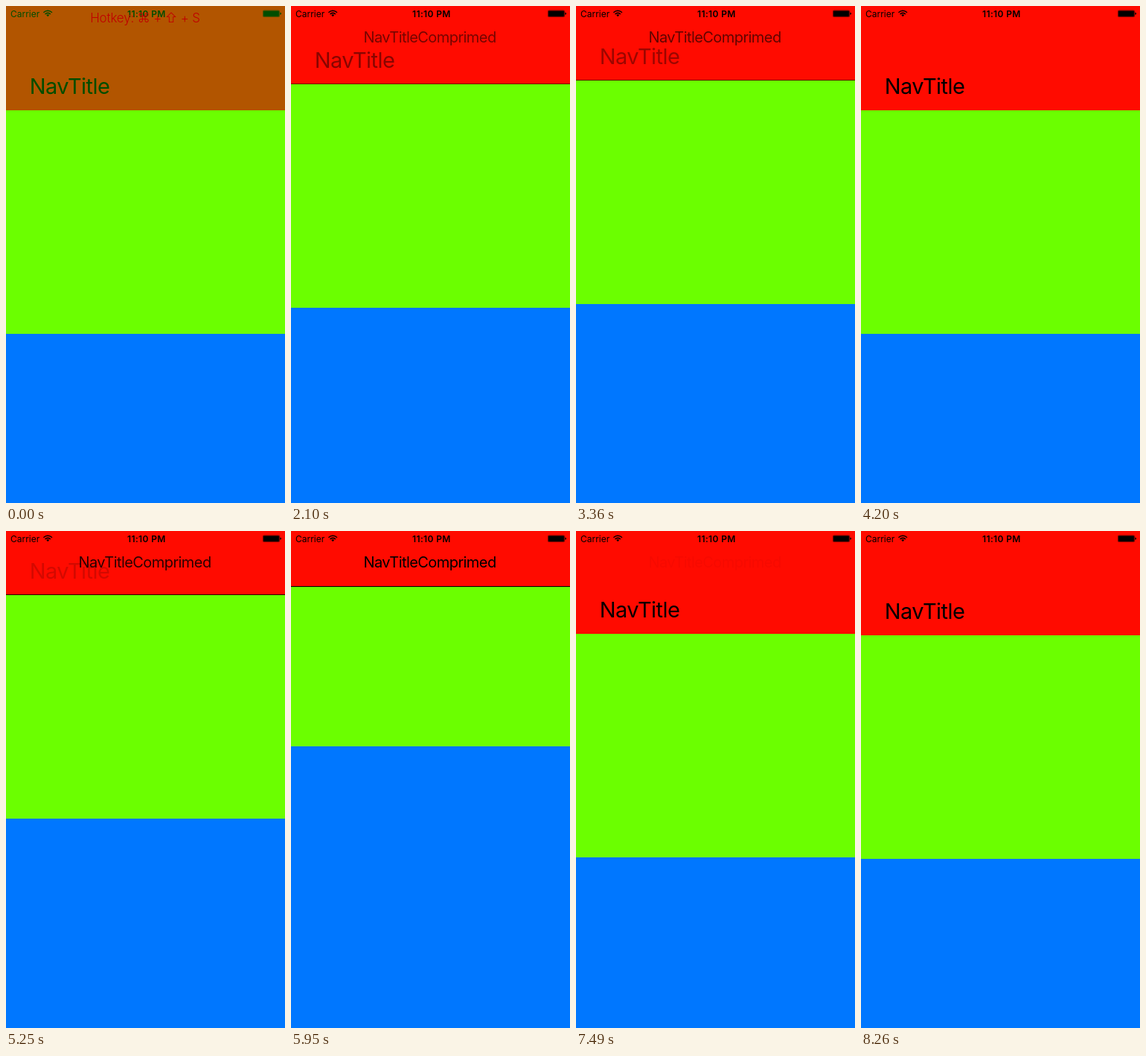
These frames come from a looping animation (375x667 px, 9.03 s). An HTML page:

```html
<!DOCTYPE html>
<html lang="en">
<head>
<meta charset="utf-8">
<title>Collapsing navigation bar</title>
<style>
  html, body { margin: 0; width: 100%; height: 100%; overflow: hidden; background: #fff; }
  svg { display: block; width: 375px; height: 667px; }
  text { font-family: Inter, Roboto, sans-serif; font-optical-sizing: none; }
  #large { font-size: 29px; letter-spacing: -.02em; }
  #compact { font-size: 20px; letter-spacing: -.028em; }
  .status { font-size: 12px; }
  .clock { font-weight: 600; letter-spacing: .03em; }
  .hotkey { font-size: 17px; font-weight: 300; letter-spacing: -.01em; }
  .middle { text-anchor: middle; }
</style>
</head>
<body>
<svg viewBox="0 0 375 667">
  <g id="content">
    <rect width="375" height="300" fill="#6bff00"/>
    <rect y="300" width="375" height="800" fill="#0077ff"/>
  </g>
  <rect id="bar" width="375" fill="#ff0b00"/>
  <rect id="line" width="375" height="1"/>
  <text id="large" x="31.7" >NavTitle</text>
  <text id="compact" class="middle" x="186.5" y="49">NavTitleComprimed</text>

  <text class="status" x="6" y="14.6">Carrier</text>
  <g fill="none" stroke="#000" stroke-width="1.5">
    <path d="M50.4 8.8Q56.2 3.8 62 8.8M52.5 11Q56.2 7.8 59.9 11"/>
    <path d="M56.2 14.2L54.2 12.1Q56.2 10.6 58.2 12.1Z" fill="#000" stroke="none"/>
  </g>
  <text class="status clock middle" x="188.9" y="14.6">11:10 PM</text>
  <rect x="345" y="5.5" width="23" height="9.5" rx="1.8" opacity=".55"/>
  <rect x="346.2" y="6.7" width="20.6" height="7.1" rx=".8"/>
  <path d="M368.4 8.5Q370 8.8 370 10.2T368.4 11.9Z"/>

  <g id="hint">
    <rect width="375" height="140" fill="#0f0" opacity=".3"/>
    <text class="hotkey middle" x="187" y="22" fill="#c00000">Hotkey: ⌘ + ⇧ + S</text>
  </g>
</svg>
<script>
const LOOP = 9030, STEP = 70, MIN_BAR = 75, MAX_BAR = 140;
const part = id => document.getElementById(id);
const [content, bar, line, large, compact, hint] =
  ["content", "bar", "line", "large", "compact", "hint"].map(part);

const linear = p => p;
const speedUp = p => p ** 1.5;
const slowDown = p => 1 - (1 - p) ** 2;
const smooth = p => p * p * (3 - 2 * p);
// Critically damped return after pulling past the top.
const spring = p => 1 - (1 + 8 * p) * Math.exp(-8 * p);

// Top of the scrolled content: start, end, from, to, easing
const moves = [
  [2030, 2100, 140, 105, linear],
  [2100, 2520, 105, 74, slowDown],
  [3150, 3360, 74, 100, speedUp],
  [3360, 3570, 100, 222, smooth],
  [3570, 4266, 222, 140, spring],
  [4550, 5250, 140, 86, linear],
  [5250, 5460, 86, 74, linear],
  [5460, 6160, 74, -34, smooth],
  [6300, 6790, -34, -98, smooth],
  [7210, 7630, -98, 221, smooth],
  [7630, 8326, 221, 140, spring]
];

function contentTop(time) {
  const move = moves.findLast(m => time >= m[0]);
  if (!move) return MAX_BAR;
  const [start, end, from, to, ease] = move;
  const progress = Math.min(1, (time - start) / (end - start));
  return Math.round(from + (to - from) * ease(progress));
}

function draw(now) {
  const time = Math.floor(now % LOOP / STEP) * STEP;
  const top = contentTop(time);
  const height = Math.min(MAX_BAR, Math.max(MIN_BAR, top));
  const expanded = (height - MIN_BAR) / (MAX_BAR - MIN_BAR);

  content.setAttribute("transform", `translate(0 ${top})`);
  bar.setAttribute("height", height);
  line.setAttribute("y", height - 1);
  large.setAttribute("y", height - 22.5);
  large.setAttribute("opacity", expanded);
  for (const el of [line, compact]) el.setAttribute("opacity", 1 - expanded);
  hint.setAttribute("visibility", time < STEP ? "visible" : "hidden");
}

const origin = performance.now();
function tick() {
  draw(performance.now() - origin);
  requestAnimationFrame(tick);
}
tick();
</script>
</body>
</html>
```
